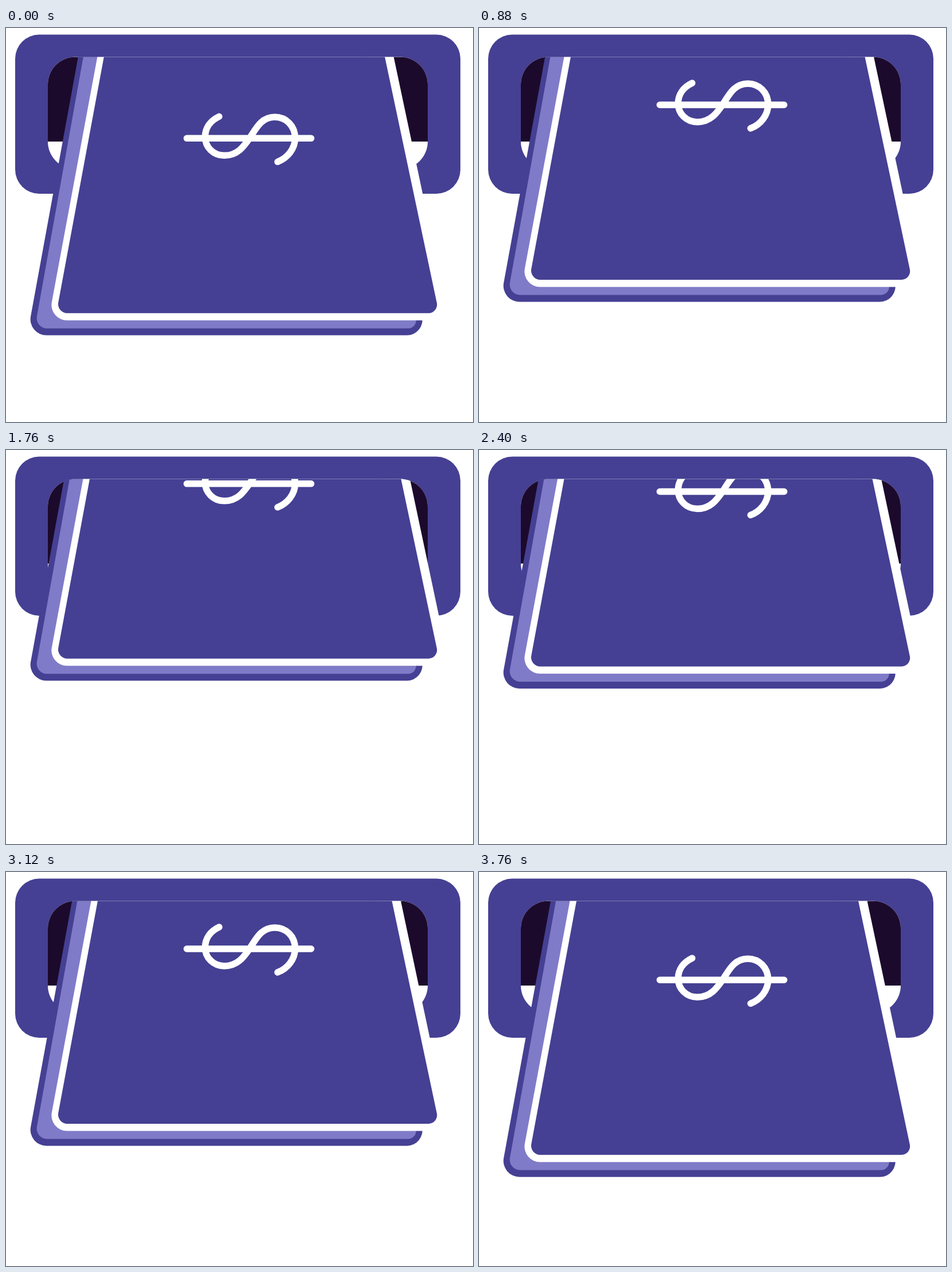
An HTML page with a canvas for the animation above (3840 ms loop, 815x687 px).

```html
<!DOCTYPE html>
<html lang="en">
<head>
<meta charset="utf-8">
<title>Cash slot</title>
<style>
  html, body { margin: 0; width: 100%; height: 100%; overflow: hidden; background: #fff; }
  canvas { display: block; width: 815px; height: 687px; }
</style>
</head>
<body>
<canvas width="815" height="687"></canvas>
<script>
const INDIGO = '#454093', LILAC = '#807bc8', DARK = '#1c0a2c', WHITE = '#fff';
const STEP = 80, STEPS = 48, TOP = 50.5;
const ctx = document.querySelector('canvas').getContext('2d');

// Layers of the bill, back to front: edges at the slot's top, slopes, bottom, corner radii
const layers = [
  { color: INDIGO, left: 126, right: 630, ls: 0.183, rs: 0.212, bottom: 536, lr: 28, rr: 27 },
  { color: LILAC, left: 135, right: 618.5, ls: 0.179, rs: 0.212, bottom: 524, lr: 18, rr: 14 },
  { color: WHITE, left: 159.5, right: 676.5, ls: 0.186, rs: 0.212, bottom: 510, lr: 27, rr: 2 },
  { color: INDIGO, left: 171, right: 661, ls: 0.186, rs: 0.2116, bottom: 497.5, lr: 16, rr: 15 }
];

const dollar = new Path2D(
  'M315.5 192.5H532.5' +
  'M372 154.5C356 162 347.5 175 347.5 190C347.5 208 362 222.5 381 222.5' +
  'C404 222.5 415 207 426 191C437 174 446 155.5 469 155.5' +
  'C489 155.5 504.5 171 504.5 192C504.5 211 491 227 474 233.5'
);

const frame = new Path2D();
frame.roundRect(16, 11.5, 777, 277.5, 42);

const slot = new Path2D();
slot.roundRect(73, TOP, 663, 195.5, 48);

// Rounded along the slot's upper edge, open below it
const opening = new Path2D(
  `M73 98.5A48 48 0 0 1 121 ${TOP}H688A48 48 0 0 1 736 98.5H815V687H0V98.5Z`
);

// Steady travel up and down with short rounded turns
function offset(n) {
  const speed = 6.83, turn = 2.5, half = STEPS / 2;
  const d = Math.abs((n - 1 + half + STEPS) % STEPS - half);
  const near = Math.min(d, half - d);
  const ease = near < turn ? speed / (2 * turn) * (turn - near) ** 2 : 0;
  return 9.76 - speed * d + (d < half / 2 ? -ease : ease);
}

function drawLayer({ color, left, right, ls, rs, bottom, lr, rr }) {
  const rise = 15, drop = bottom - 50;
  ctx.beginPath();
  ctx.moveTo(left + ls * rise, 50 - rise);
  ctx.arcTo(left - ls * drop, bottom, right + rs * drop, bottom, lr);
  ctx.arcTo(right + rs * drop, bottom, right - rs * rise, 50 - rise, rr);
  ctx.lineTo(right - rs * rise, 50 - rise);
  ctx.closePath();
  ctx.fillStyle = color;
  ctx.fill();
}

function drawMachine() {
  ctx.fillStyle = INDIGO;
  ctx.fill(frame);
  ctx.fillStyle = WHITE;
  ctx.fill(slot);
  ctx.save();
  ctx.clip(slot);
  ctx.fillStyle = DARK;
  ctx.fillRect(73, TOP, 663, 198 - TOP);
  ctx.restore();
}

function drawBill(y) {
  ctx.save();
  ctx.clip(opening);
  ctx.translate(0, y);
  layers.forEach(drawLayer);
  ctx.strokeStyle = WHITE;
  ctx.lineWidth = 11.5;
  ctx.lineCap = 'round';
  ctx.lineJoin = 'round';
  ctx.stroke(dollar);
  ctx.restore();
}

function render(time) {
  const n = Math.floor(time / STEP) % STEPS;
  ctx.clearRect(0, 0, 815, 687);
  drawMachine();
  drawBill(offset(n));
}

let start;
function tick(now) {
  start ??= now;
  render(now - start);
  requestAnimationFrame(tick);
}
render(0);
requestAnimationFrame(tick);
</script>
</body>
</html>
```
